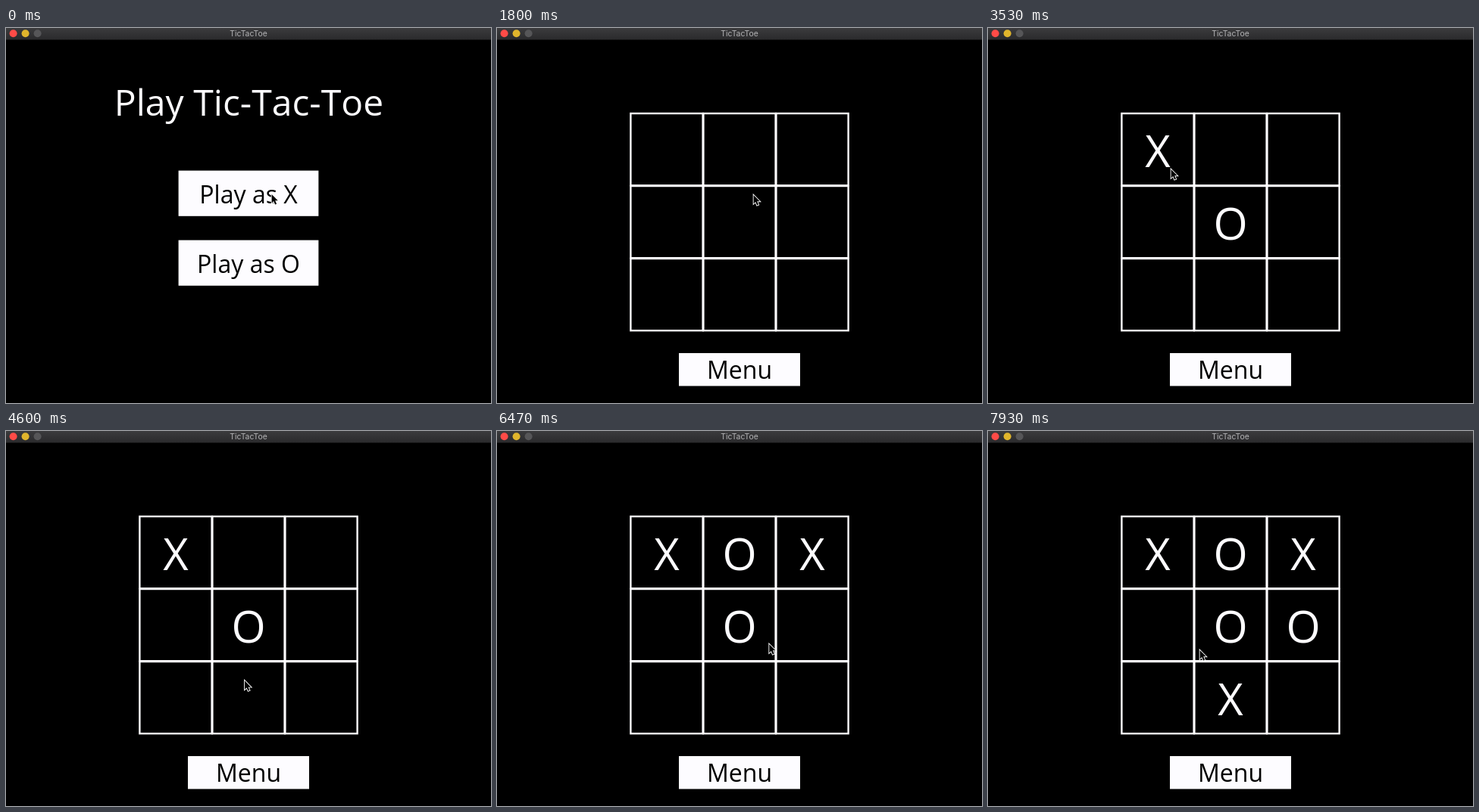
An HTML page with a canvas that plays this animation: 640 px wide and 496 px high, repeating every 8 s.

```html
<!DOCTYPE html>
<html lang="en">
<head>
<meta charset="utf-8">
<title>TicTacToe</title>
<style>
  html, body { margin: 0; width: 100%; height: 100%; overflow: hidden; background: #000; }
  canvas { display: block; }
</style>
</head>
<body>
<canvas id="stage" width="640" height="496"></canvas>
<script>
const ctx = document.getElementById('stage').getContext('2d');
const LOOP = 8000;
const TICK = 1000 / 15;
const TILE = 96;
const BOARD = { x: 176.4, y: 113 };
const CENTER = 320;
const WHITE = '#fdfcff';

const GAME_START = 27;

// X and O alternate over these cells; each O answers an X after a short delay.
const PLAYED_CELLS = [0, 4, 2, 1, 7, 5];
const X_CLICKS = [52, 82, 106.4];
const REPLY_DELAY = 0.6;

// Each glide of the cursor eases out towards (x, y); times are in ticks.
const CURSOR_START = { x: 350, y: 219 };
const GLIDES = [
  { start: 0, length: 1, x: 342, y: 220 },
  { start: 9, length: 10, x: 320, y: 220 },
  { start: 21, length: 3, x: 338, y: 220 },
  { start: 34, length: 8, x: 292, y: 282 },
  { start: 45, length: 5, x: 241, y: 186 },
  { start: 54, length: 5, x: 298, y: 356 },
  { start: 68, length: 13, x: 409, y: 176 },
  { start: 92, length: 13, x: 328, y: 345 },
  { start: 113, length: 6, x: 279, y: 289 }
];

const easeOut = p => 1 - (1 - p) ** 2;
const clamp = p => Math.max(0, Math.min(1, p));

function text(str, x, baseline, size, color, family = 'Open Sans', kerning = 'none') {
  ctx.font = `${size}px "${family}", sans-serif`;
  ctx.fontKerning = kerning;
  ctx.textAlign = 'center';
  ctx.fillStyle = color;
  ctx.fillText(str, x, baseline);
}

function button(label, y, w, h, baseline) {
  ctx.fillStyle = WHITE;
  ctx.fillRect(CENTER - w / 2, y, w, h);
  text(label, CENTER, baseline, 32, '#000');
}

function titleBar() {
  const shade = ctx.createLinearGradient(0, 0, 0, 15);
  shade.addColorStop(0, '#3b3b3d');
  shade.addColorStop(1, '#2b2b2d');
  ctx.fillStyle = shade;
  ctx.fillRect(0, 0, 640, 15.5);
  ['#ff4b47', '#e0b52c', '#565658'].forEach((color, i) => {
    ctx.fillStyle = color;
    ctx.beginPath();
    ctx.arc(9.6 + 16 * i, 7.2, 5, 0, 2 * Math.PI);
    ctx.fill();
  });
  text('TicTacToe', CENTER, 11, 10.4, '#b4b4b6', 'Inter', 'normal');
}

function menu() {
  text('Play Tic-Tac-Toe', CENTER + 0.5, 116, 48, WHITE);
  ['X', 'O'].forEach((mark, i) => {
    const y = 188.6 + 92 * i;
    button(`Play as ${mark}`, y, 184.8, 60.2, y + 43);
  });
}

function eachCell(cells, drawCell) {
  cells.forEach((cell, i) => {
    drawCell(BOARD.x + (cell % 3) * TILE, BOARD.y + Math.floor(cell / 3) * TILE, i);
  });
}

function game(tick) {
  const side = TILE - 0.8;
  ctx.strokeStyle = WHITE;
  ctx.lineWidth = 2.4;
  eachCell([...Array(9).keys()], (x, y) => ctx.strokeRect(x, y, side, side));
  eachCell(PLAYED_CELLS, (x, y, turn) => {
    const reply = turn % 2;
    const playedAt = X_CLICKS[Math.floor(turn / 2)] + reply * REPLY_DELAY;
    if (tick >= playedAt) text(reply ? 'O' : 'X', x + side / 2, y + 70.5, 58, WHITE);
  });
  button('Menu', 430, 160, 43.5, 464);
}

function cursorAt(tick) {
  return GLIDES.reduce((from, glide) => {
    const p = easeOut(clamp((tick - glide.start) / glide.length));
    return { x: from.x + (glide.x - from.x) * p, y: from.y + (glide.y - from.y) * p };
  }, CURSOR_START);
}

function cursor({ x, y }) {
  const arrow = [[0, 0], [0, 11.6], [2.6, 9.2], [4.5, 13.6], [6.5, 12.8], [4.6, 8.4], [8.2, 8.4]];
  ctx.beginPath();
  for (const [dx, dy] of arrow) ctx.lineTo(x + 0.6 + dx, y + 0.9 + dy);
  ctx.closePath();
  ctx.lineWidth = 1.8;
  ctx.strokeStyle = '#fff';
  ctx.stroke();
  ctx.fillStyle = '#000';
  ctx.fill();
}

function draw(now) {
  // A small lead absorbs frame times rounded to 10 ms.
  const tick = Math.min(119, Math.floor((now % LOOP + 3.4) / TICK));
  ctx.fillStyle = '#000';
  ctx.fillRect(0, 0, 640, 496);
  titleBar();
  if (tick < GAME_START) menu();
  else game(tick);
  cursor(cursorAt(tick));
}

const begin = performance.now();
function loop() {
  draw(performance.now() - begin);
  requestAnimationFrame(loop);
}
loop();
</script>
</body>
</html>
```
